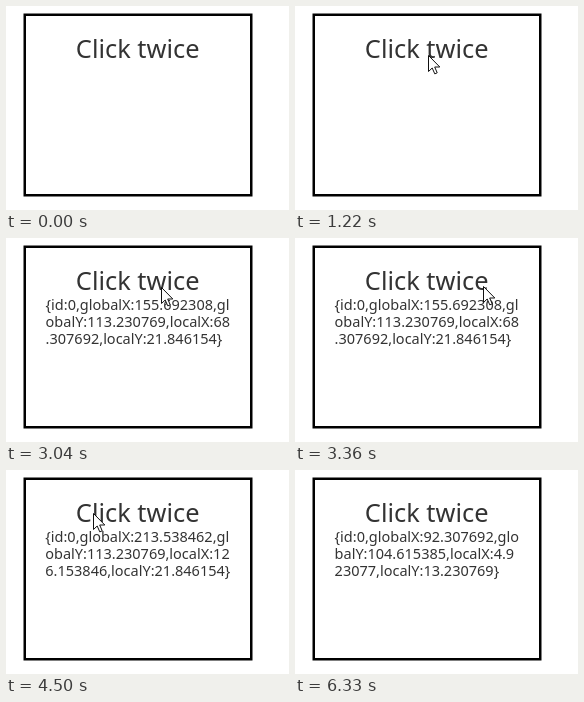
Recreate the animation shown at these times as an HTML page. Size 283 by 204 pixels, loop 7.16 s.

```html
<!DOCTYPE html>
<html lang="en">
<head>
<meta charset="utf-8">
<title>Click twice</title>
<style>
  html, body { margin: 0; width: 100%; height: 100%; overflow: hidden; background: #fff; }
  svg { display: block; }
  text { font-family: "Noto Sans", "Open Sans", sans-serif; fill: #333; }
  .title { font-size: 25.4px; text-anchor: middle; }
  .info { font-size: 14.5px; }
</style>
</head>
<body>
<svg width="283" height="204" viewBox="0 0 283 204">
  <rect x="18.75" y="8.75" width="226.5" height="180.5" fill="#fff" stroke="#000" stroke-width="2.5"/>
  <text class="title" x="131.7" y="52">Click twice</text>
  <text class="info" y="72"></text>
  <text class="info" y="89"></text>
  <text class="info" y="106"></text>
  <path id="cursor" d="M.5.5V16.5L4.2 13L6.8 18.9L9.2 17.8L6.7 12H11.8Z" fill="#fff" stroke="#111"/>
</svg>
<script>
const LOOP = 7160, STEP = 40, LEAVE = 6330, CENTER = 131.8;
const DENSITY = 1.625; // device pixels per reported unit
const BOX = { x: 142, y: 148.5 }; // touch area's corner in device pixels

// The pointer glides from one resting place to the next.
const entry = { x: 11, y: 123 };
const moves = [
  { at: 540, lasts: 680, x: 133, y: 49 },
  { at: 3000, lasts: 360, x: 188, y: 48 },
  { at: 3770, lasts: 40, x: 186, y: 49 },
  { at: 4220, lasts: 440, x: 78, y: 41 },
  { at: 4910, lasts: 40, x: 75, y: 41 },
  { at: 5400, lasts: 0, x: 73, y: 41 },
  { at: 5770, lasts: 200, x: 86, y: 45 },
  { at: 6130, lasts: 160, x: -4, y: 105 }
];

// Touches in device pixels.
const touches = [
  { at: 2090, x: 253, y: 184 },
  { at: 3970, x: 347, y: 184 },
  { at: 5440, x: 150, y: 170 }
];

const cursor = document.getElementById("cursor");
const lines = [...document.querySelectorAll(".info")];
const latest = (list, t) => list.findLastIndex(item => item.at <= t);
const easeOut = (u, power) => 1 - (1 - u) ** power;
const units = px => (px / DENSITY).toFixed(6);

function pointerAt(t) {
  const i = latest(moves, t);
  if (i < 0 || t >= LEAVE) return null;
  const from = moves[i - 1] || entry, to = moves[i];
  const elapsed = Math.min(to.lasts, Math.floor((t - to.at) / STEP) * STEP);
  const u = Math.min(1, (elapsed + STEP) / (to.lasts + STEP));
  const glide = (axis, power) => Math.round(from[axis] + (to[axis] - from[axis]) * easeOut(u, power));
  return [glide("x", 2.3), glide("y", 1.2)];
}

function report(touch) {
  if (!touch) return "";
  const { x, y } = touch;
  return `{id:0,globalX:${units(x)},globalY:${units(y)},` +
    `localX:${units(x - BOX.x)},localY:${units(y - BOX.y)}}`;
}

// Wrap into three lines and centre the block by its widest line.
function showReport(text) {
  const parts = [text.slice(0, 27), text.slice(27, 53), text.slice(53)];
  lines.forEach((line, i) => line.textContent = parts[i]);
  const width = Math.max(...lines.map(line => line.getComputedTextLength()));
  lines.forEach(line => line.setAttribute("x", CENTER - width / 2));
}

function draw(t) {
  showReport(report(touches[latest(touches, t)]));
  const point = pointerAt(t);
  cursor.style.display = point ? "" : "none";
  if (point) cursor.setAttribute("transform", `translate(${point})`);
}

const begin = performance.now();
function frame() {
  draw((performance.now() - begin) % LOOP);
  requestAnimationFrame(frame);
}
frame();
</script>
</body>
</html>
```
